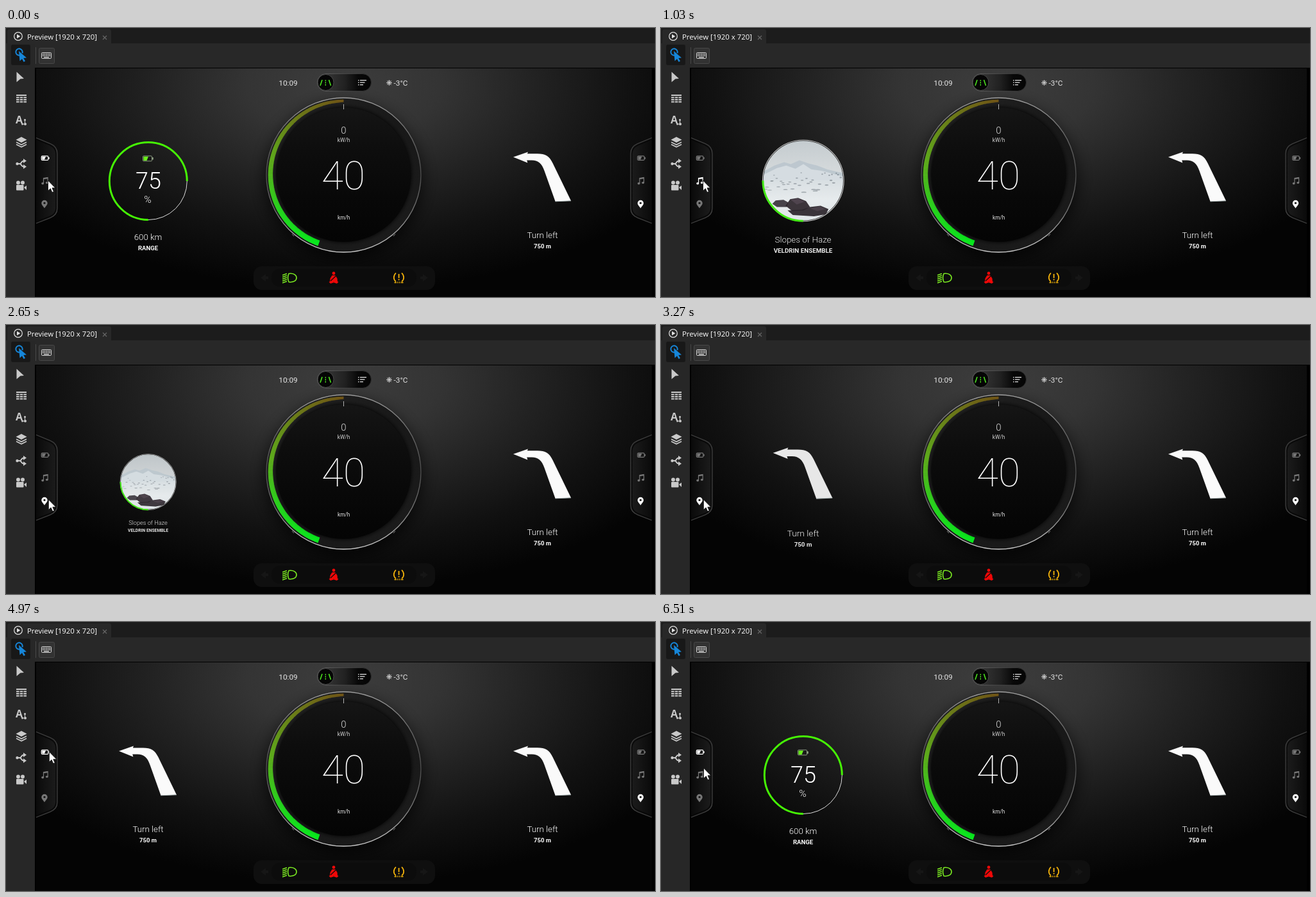
An HTML page with a canvas for the animation above (6610 ms loop, 1012 by 420 pixels).

```html
<!DOCTYPE html>
<html lang="en">
<head>
<meta charset="utf-8">
<title>Preview</title>
<style>
html, body { margin: 0; width: 100%; height: 100%; overflow: hidden; background: #000; }
canvas { display: block; width: 1012px; height: 420px; }
</style>
</head>
<body>
<canvas id="stage" width="1012" height="420"></canvas>
<script>
const c = document.getElementById('stage').getContext('2d');
const LOOP = 6610, RAD = Math.PI / 180, TAU = Math.PI * 2;
const GREEN = '#46f505', ICON = '#c9c9c9', DIM = '#777';
const PIVOT = [221.5, 260];

function rect(x, y, w, h, fill) { c.fillStyle = fill; c.fillRect(x, y, w, h); }
function round(x, y, w, h, r, fill, stroke, lw = 1) {
  c.beginPath(); c.roundRect(x, y, w, h, r);
  if (fill) { c.fillStyle = fill; c.fill(); }
  if (stroke) { c.strokeStyle = stroke; c.lineWidth = lw; c.stroke(); }
}
function disc(x, y, r, fill) { c.beginPath(); c.arc(x, y, r, 0, TAU); c.fillStyle = fill; c.fill(); }
function arc(x, y, r, from, to, stroke, lw) {
  c.beginPath(); c.arc(x, y, r, from * RAD, to * RAD);
  c.strokeStyle = stroke; c.lineWidth = lw; c.stroke();
}
function oval(x, y, rx, ry, fill) { c.beginPath(); c.ellipse(x, y, rx, ry, 0, 0, TAU); c.fillStyle = fill; c.fill(); }
function shape(d, fill, stroke, lw = 1, x = 0, y = 0) {
  const p = new Path2D(d);
  c.save(); c.translate(x, y);
  if (fill) { c.fillStyle = fill; c.fill(p); }
  if (stroke) { c.strokeStyle = stroke; c.lineWidth = lw; c.stroke(p); }
  c.restore();
}
function text(s, x, y, size, weight = 400, color = '#fff', align = 'center', family = 'Roboto') {
  c.font = `${weight} ${size}px "${family}", sans-serif`;
  c.textAlign = align; c.fillStyle = color; c.fillText(s, x, y);
}
function linear(x0, y0, x1, y1, ...colors) {
  const g = c.createLinearGradient(x0, y0, x1, y1);
  colors.forEach((k, i) => g.addColorStop(i / (colors.length - 1), k));
  return g;
}

// editor frame
function editor() {
  rect(0, 0, 1012, 420, '#1c1c1c');
  rect(0, 24, 1012, 38, '#282828');
  rect(0, 24, 45, 396, '#272727');
  round(2, 2, 162, 23, [3, 3, 0, 0], '#282828');
  arc(19, 13, 6.3, 0, 360, '#e4e4e4', 1.2);
  shape('M17 9.8L22.3 13L17 16.2Z', '#e4e4e4');
  text('Preview [1920 x 720]', 33, 17.5, 11.4, 400, '#fff', 'left', 'Open Sans');
  shape('M151 12L157 18M157 12L151 18', null, '#666', 1.2);

  round(8, 26, 30, 32, 3, '#181818');
  arc(20.5, 37.5, 5.2, 70, 380, '#1686d9', 2);
  shape('M20 36L32 46.5L27.3 47L30 51.8L27.6 53L25 48.2L21.5 51.5Z', '#1686d9');
  rect(46, 30, 1, 26, '#484848');
  round(51.5, 31.5, 24, 24, 2, '#323232', '#484848');
  round(55.5, 38.5, 15, 9, 1, null, '#ddd');
  for (let r = 0; r < 2; r++)
    for (let k = 0; k < 5; k++) rect(57 + k * 2.6, 40 + r * 2.5, 1.6, 1.5, '#ddd');
  rect(59, 45, 8, 1.3, '#ddd');

  shape('M16.5 68.5L28 79L22.4 79.4L16.5 84.5Z', ICON);
  rect(16, 104, 16, 2, ICON);
  for (let r = 0; r < 3; r++)
    for (let k = 0; k < 3; k++) rect(16 + k * 5.7, 107.5 + r * 3.4, 4.6, 2.1, ICON);
  text('A', 20.5, 149, 16, 700, ICON, 'center', 'Open Sans');
  shape('M29.5 142V150M26 150H30', null, ICON, 1.1);
  disc(29.5, 143.5, 1.5, ICON); disc(25.5, 150, 1.5, ICON); disc(30, 150, 2, ICON);
  shape('M24 170L32.5 174.5L24 179L15.5 174.5Z', ICON);
  shape('M16 178.2L24 182.2L32 178.2M16 181.8L24 185.8L32 181.8', null, ICON, 1.7);
  shape('M17 212H21C25 212 23 207.5 28 207.5M21 212C25 212 23 216.5 28 216.5', null, ICON, 2);
  shape('M27 204L32 207.5L27 211ZM27 213L32 216.5L27 220Z', ICON);
  disc(17.5, 212, 2.2, ICON);
  disc(19, 241.5, 3, ICON); disc(26, 241.5, 3, ICON);
  round(16, 245, 11.5, 8.5, 1, ICON);
  shape('M28 249L32 246V253Z', ICON);
}

// instrument panel background
function backdrop() {
  rect(45, 62, 967, 358, '#000');
  c.save();
  c.beginPath(); c.rect(47, 63, 960, 357); c.clip();
  c.translate(526, 90); c.scale(1, 320 / 600);
  const g = c.createRadialGradient(0, 0, 0, 0, 0, 600);
  [['#3d3d3d', 0], ['#343434', .25], ['#222', .5], ['#111', .75], ['#040404', 1]].forEach(s => g.addColorStop(s[1], s[0]));
  rect(-480, -100, 962, 740, g);
  c.restore();
}

function header() {
  text('10:09', 440, 90, 11.8, 400, '#e6e6e6');
  for (let a = 0; a < 180; a += 45) {
    const x = Math.cos(a * RAD) * 4.3, y = Math.sin(a * RAD) * 4.3;
    shape(`M${-x} ${-y}L${x} ${y}`, null, '#d0d0d0', .9, 597.5, 85.5);
  }
  arc(597.5, 85.5, 3, 0, 360, '#d0d0d0', .7);
  text('-3°C', 604.5, 90, 11.8, 400, '#e6e6e6', 'left');

  round(485.5, 71.5, 84, 27, 13.5, linear(486, 0, 570, 0, '#161616', '#303030', '#222', '#080808', '#050505'),
    linear(486, 0, 570, 0, '#666', '#484848', '#2c2c2c'));
  disc(498.5, 85, 12.5, '#050505');
  arc(498.5, 85, 12.5, 0, 360, '#4a4a4a', 1);
  shape('M493 81L490 90M503.5 81L506.5 90', null, '#4be01e', 1.6);
  shape('M498.3 81V90', null, '#4be01e', 1.3);
  rect(497, 83, 3, 1, '#050505'); rect(497, 86.5, 3, 1, '#050505');
  [0, 1, 2].forEach(i => {
    rect(549, 81 + i * 3.5, 1.5, 1.4, '#ddd');
    rect(552, 81 + i * 3.5, 10 - i * 2.5, 1.3, '#ddd');
  });
}

function powerArc(x, y) {
  const stops = [[112, 84, 22], [108, 124, 25], [94, 172, 28], [36, 214, 30], [8, 234, 30]];
  const n = 160;
  for (let i = 0; i < n; i++) {
    const p = i / n, q = p * 4, k = Math.floor(q), f = q - k;
    const rgb = stops[k].map((v, j) => Math.round(v + (stops[k + 1][j] - v) * f));
    const w = 4 + 5 * p ** .7;
    arc(x, y, 117.7 - w / 2, 270 - i - 1.1, 270 - i + (i ? .2 : 0), `rgb(${rgb})`, w);
  }
}

function dial() {
  const x = 526.5, y = 229.5;
  c.save();
  c.shadowColor = 'rgba(0,0,0,.8)'; c.shadowBlur = 28; c.shadowOffsetY = 9;
  disc(x, y, 120, '#171717');
  c.restore();
  disc(x, y, 120, linear(430, 130, 620, 330, '#222', '#181818', '#1b1b1b'));
  arc(x, y, 120.5, 0, 360, linear(0, 108, 0, 351, '#a0a0a0', '#666', '#4c4c4c', '#777', '#d0d0d0'), 1.4);
  powerArc(x, y);
  c.save();
  c.shadowColor = '#000'; c.shadowBlur = 7;
  disc(x, y - .5, 105, '#0b0b0b');
  c.restore();
  disc(x, y - .5, 105, linear(0, 124, 0, 334, '#151515', '#0d0d0d', '#080808', '#040404'));
  rect(526, 119, 1, 8, '#b0b0b0');
  shape('M446 321.5L449 325M607 321.5L604 325', null, '#555', 1.2);
  text('0', 526.3, 164.7, 15, 300, '#d8d8d8');
  text('kW/h', 526.5, 178, 8.3, 400, '#d4d4d4');
  text('40', 526, 251.5, 62, 100);
  text('km/h', 526.7, 299, 8.3, 400, '#e4e4e4');
}

function warnings() {
  round(386, 372, 283, 37, 13, '#0f0f0f');
  round(414, 376, 226, 28, 13, '#0c0c0c');
  const left = 'M397 390L405 384V388H409V392H405V396Z';
  shape(left, '#161616');
  c.save(); c.translate(1055, 0); c.scale(-1, 1); shape(left, '#161616'); c.restore();

  const lamp = '#7bea22';
  shape('M441 383.5C449 382.5 453 386 453 390C453 394 449 397.5 441 396.5C439 392 439 388 441 383.5Z', null, lamp, 1.6);
  for (let i = 0; i < 5; i++) shape(`M431 ${386 + i * 3}L438 ${383.5 + i * 3}`, null, lamp, 1.4);

  const red = '#f00808';
  disc(511, 383, 2.4, red);
  shape('M508.5 386.3H513.5L516.5 391L517 396H505L505.5 391Z', red);
  shape('M503.5 396.5L508 394.5L511 396.5L514 394.5L518.5 396.5L516 399L511 397.6L506 399Z', red);
  shape('M514.5 387L506 395', null, '#0c0c0c', 1.1);

  const amber = '#f7b50a';
  shape('M608 382.5C603.5 387 604 393 608 396M617 382.5C621.5 387 621 393 617 396M605.5 397.5H609M616 397.5H619.5', null, amber, 1.7);
  shape('M611 396V398.5M614 396V398.5', null, amber, 1.2);
  rect(611.7, 384, 1.8, 6.5, amber);
  rect(611.7, 392, 1.8, 1.8, amber);
}

function sideIcons(x, active) {
  const tone = i => i === active ? '#fff' : DIM;
  round(x - 5.5, 199.8, 10.5, 6.6, 1.5, null, tone(0), 1.2);
  rect(x + 5.4, 201.7, 1.5, 3, tone(0));
  shape('M-4.5 200.8H1.2L-.8 205.6H-4.5Z', tone(0), null, 1, x);
  shape('M-2.3 242V234.6L4.3 233.4V241', null, tone(1), 1.2, x);
  shape('M-2.3 235.4L4.3 234.2', null, tone(1), 1.9, x);
  oval(x - 3.6, 242.7, 2, 1.7, tone(1));
  oval(x + 3, 241.6, 2, 1.7, tone(1));
  shape('M-.8 281.5C-2.3 278.5 -5.5 276.5 -5.5 273.5A4.7 4.7 0 0 1 3.9 273.5C3.9 276.5 .7 278.5 -.8 281.5Z', tone(2), null, 1, x);
  disc(x - .8, 273.3, 1.6, '#151515');
}

function sideTab() {
  const d = 'M47 171.5L69 180.5Q80 185 80 196V282Q80 292 69 296.5L47 305';
  shape(d, linear(47, 0, 80, 0, '#0a0a0a', '#1d1d1d'));
  shape(d, null, '#444', 1.1);
  shape('M47 174L68 182.5Q78 187 78 197V281Q78 290.5 68 294.5L47 302.5', null, '#080808', 1.5);
}
function sides(active) {
  sideTab();
  c.save(); c.translate(1054, 0); c.scale(-1, 1); sideTab(); c.restore();
  sideIcons(60.8, active);
  sideIcons(990.3, 2);
}

// widgets
function battery() {
  const x = 221.8, y = 239;
  arc(x, y, 60.5, 0, 90, '#ddd', 1);
  arc(x, y, 60.5, 90, 360, GREEN, 3);
  round(213.5, 199.8, 14, 8, 1, null, '#8b9b80', 1);
  rect(228, 202, 1.8, 3.6, '#8b9b80');
  shape('M214.5 200.8H222L219.5 207H214.5Z', '#6bef1c');
  text('75', 222, 251, 36, 300);
  text('%', 221, 273, 15.5, 300);
  text('600 km', 221.5, 331.3, 13.3, 300);
  text('RANGE', 221.5, 347, 9.5, 700);
}

function music() {
  const x = 221.8, y = 239;
  c.save();
  c.beginPath(); c.arc(x, y, 61, 0, TAU); c.clip();
  rect(160, 177, 124, 124, linear(0, 177, 0, 225, '#d3dbdf', '#e6ebed'));
  shape('M160 226L178 216L193 211L203 214L216 208L230 213L243 216L258 222L284 228V244H160Z', '#bcc7ce');
  shape('M160 231L182 220L196 216L210 221L222 214L234 222L250 224L284 233V250H160Z', '#d8dfe3');
  rect(160, 238, 124, 64, linear(0, 238, 0, 300, '#d8dfe2', '#e9edef', '#e2e7ea'));
  for (let i = 0; i < 40; i++) {
    const u = (i * .618) % 1, v = (i * i * .377) % 1;
    oval(163 + u * 118, 226 + v * 32, 1 + v * 3, .6 + u * .5, 'rgba(70,78,88,.45)');
  }
  shape('M175 274L180 269L192 268L199 272L197 279L182 279Z', '#38333a');
  shape('M195 277L202 267L214 265L226 270L232 279L222 284L205 285Z', '#2c252b');
  shape('M203 268L214 266L224 271L212 275Z', '#524650');
  shape('M198 284L220 283L232 279L248 277L260 282L256 290L238 293L206 291Z', '#2a242a');
  shape('M232 281L247 278L256 282L243 285Z', '#4d434c');
  c.restore();
  arc(x, y, 61.3, 0, 360, '#111', 2);
  arc(x, y, 61.5, 0, 360, '#e2e2e2', 1);
  arc(x, y, 61, 90, 180, '#3ef00c', 3);
  text('Slopes of Haze', 221.5, 332.8, 13, 300);
  text('VELDRIN ENSEMBLE', 221.5, 348.3, 9.5, 700);
}

function turn() {
  shape('M176 201.5L199 193.5L197.8 196.3H212C226 196 232 199.5 237.5 211L266 269.8L241.5 270.8L224.5 223C220.5 211.5 215 206.8 205 206.5H197.2L198.3 210.5Z', '#fafafa');
  shape('M241.5 270.8L266 269.8', null, '#b5c0c0', 1);
  text('Turn left', 221.5, 328.3, 13.3, 300);
  text('750 m', 221.5, 343.7, 9.5, 700);
}

const swaps = [
  { start: 250, mid: 740, end: 1110, from: battery, to: music, icon: 1 },
  { start: 2440, mid: 2875, end: 3375, from: music, to: turn, icon: 2 },
  { start: 4970, mid: 5315, end: 5815, from: turn, to: battery, icon: 0 }
];
const SMALL = .4;

function outBack(p) { const u = p - 1; return 1 + 2.70158 * u ** 3 + 1.70158 * u * u; }

function widget(draw, scale, alpha) {
  c.save();
  c.globalAlpha = alpha;
  c.translate(...PIVOT); c.scale(scale, scale); c.translate(-PIVOT[0], -PIVOT[1]);
  draw();
  c.restore();
}

function leftWidget(t, s) {
  if (!s) return widget(battery, 1, 1);
  if (t < s.mid) {
    const p = (t - s.start) / (s.mid - s.start);
    return widget(s.from, 1 - (1 - SMALL) * p, 1 - p ** 3);
  }
  const p = Math.min(1, (t - s.mid) / (s.end - s.mid));
  widget(s.to, SMALL + (1 - SMALL) * outBack(p), 1 - (1 - p) ** 1.6);
}

// pointer path: time, x, y
const path = [
  [0, 65.5, 238], [1280, 65.5, 238], [1600, 63.6, 254], [1900, 66, 270.5], [2070, 66.3, 272.5],
  [3520, 66.3, 272.5], [3880, 69, 243], [4220, 68.5, 212], [4720, 67.3, 202.5],
  [6140, 67.3, 202.5], [6510, 66.5, 228], [LOOP, 66.5, 228]
];
function pointer(t) {
  const i = path.findIndex(k => k[0] > t), [t0, x0, y0] = path[i - 1], [t1, x1, y1] = path[i];
  const p = (t - t0) / (t1 - t0);
  shape('M0 0V16.2L3.8 12.7L6.4 18.6L9 17.5L6.5 11.8H11.5Z', '#fff', '#111', .9,
    x0 + (x1 - x0) * p, y0 + (y1 - y0) * p);
}

function draw(t) {
  const swap = swaps.filter(k => t >= k.start).pop();
  editor();
  backdrop();
  header();
  dial();
  warnings();
  sides(swap ? swap.icon : 0);
  c.save(); c.translate(615, 0); turn(); c.restore();
  leftWidget(t, swap);
  pointer(t);
}

const begin = performance.now();
function tick() {
  draw((performance.now() - begin) % LOOP);
  requestAnimationFrame(tick);
}
tick();
</script>
</body>
</html>
```
